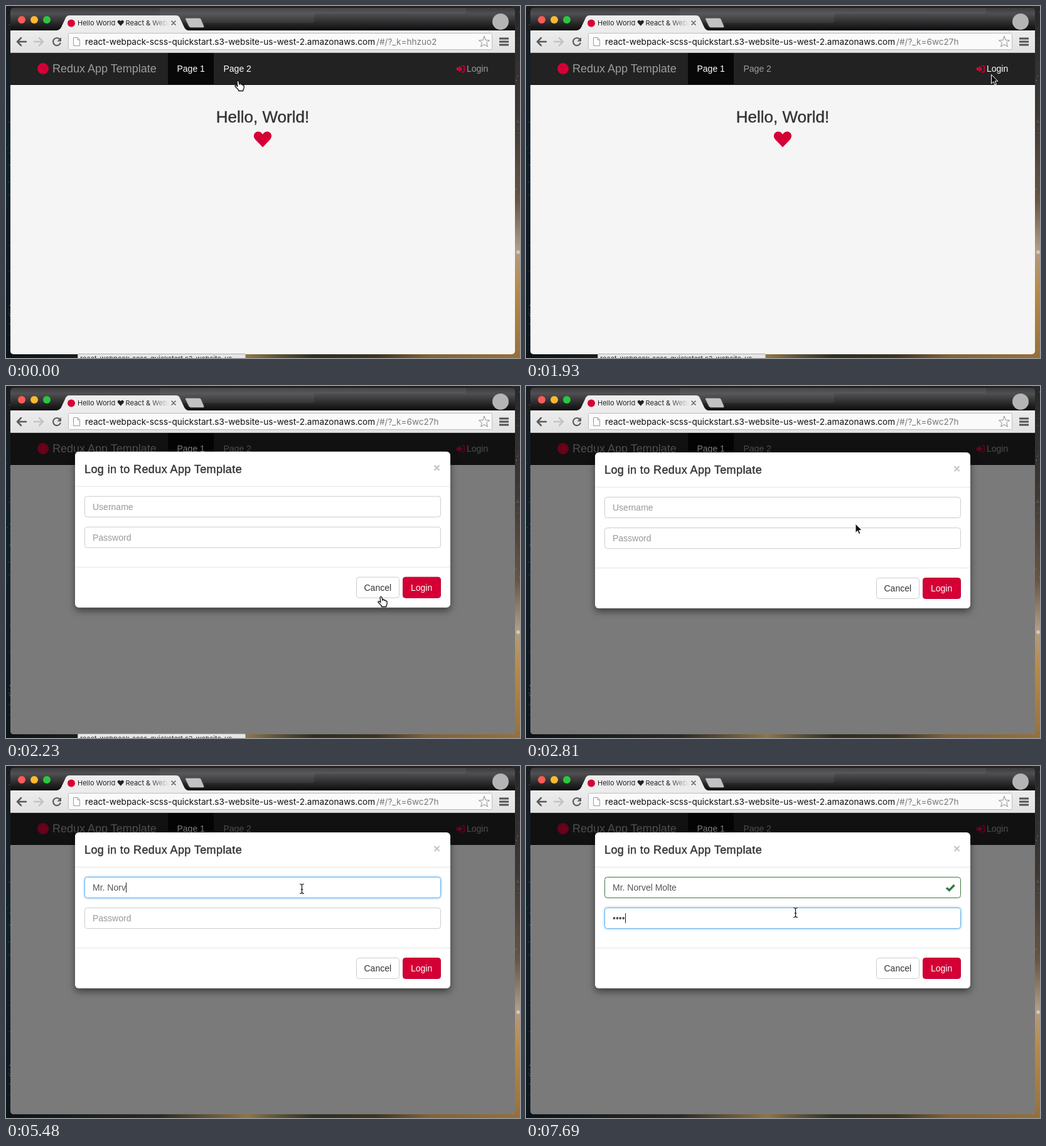
An HTML page for the animation above (7.99 s loop, 819x562 px).

```html
<!DOCTYPE html>
<html lang="en">
<head>
<meta charset="utf-8">
<title>Login walkthrough</title>
<style>
  html, body { margin: 0; width: 100%; height: 100%; overflow: hidden; background: #0d151b; }
  svg { display: block; }
  text { font: 14px "Liberation Sans", Arial, sans-serif; white-space: pre; }
  .ui { font-family: Inter, Roboto, sans-serif; }
  .medium { fill: #333; stroke: #333; stroke-width: .4; }
  .line { fill: none; stroke-linecap: round; stroke-linejoin: round; }
  .field { fill: #fff; stroke: #ccc; }
  .focus { stroke: #66afe9; filter: drop-shadow(0 0 2px rgba(102, 175, 233, .75)); }
  .valid { stroke: #3c763d; }
  #modal > .box { filter: drop-shadow(0 5px 6px rgba(0, 0, 0, .5)); }
</style>
</head>
<body>
<svg width="819" height="562" viewBox="0 0 819 562">
  <defs>
    <linearGradient id="left" x2="0" y2="1">
      <stop offset="0" stop-color="#1a1d20"/><stop offset=".4" stop-color="#10202b"/><stop offset="1" stop-color="#0c161c"/>
    </linearGradient>
    <linearGradient id="right" x2="0" y2="1">
      <stop offset="0" stop-color="#26282a"/><stop offset=".3" stop-color="#3c3835"/><stop offset=".55" stop-color="#665544"/>
      <stop offset=".69" stop-color="#b09c84"/><stop offset=".8" stop-color="#b88a48"/><stop offset="1" stop-color="#96703c"/>
    </linearGradient>
    <linearGradient id="bottom">
      <stop offset="0" stop-color="#0b1318"/><stop offset=".3" stop-color="#2a2a25"/><stop offset=".47" stop-color="#8f7546"/>
      <stop offset=".53" stop-color="#5a5238"/><stop offset=".6" stop-color="#2e2e22"/><stop offset=".72" stop-color="#3c3422"/>
      <stop offset=".82" stop-color="#80623a"/><stop offset="1" stop-color="#96703c"/>
    </linearGradient>
    <linearGradient id="titlebar" x2="0" y2="1">
      <stop offset="0" stop-color="#3c3c3e"/><stop offset=".25" stop-color="#505052"/><stop offset=".6" stop-color="#303032"/>
      <stop offset="1" stop-color="#0c0c0d"/>
    </linearGradient>
    <linearGradient id="toolbar" x2="0" y2="1">
      <stop offset="0" stop-color="#ececec"/><stop offset="1" stop-color="#e2e2e2"/>
    </linearGradient>
    <linearGradient id="fade" gradientUnits="userSpaceOnUse" x1="230" x2="260" y1="0" y2="0">
      <stop offset="0" stop-color="#222"/><stop offset="1" stop-color="#222" stop-opacity="0"/>
    </linearGradient>
    <clipPath id="window"><rect x="7" y="3" width="804" height="553" rx="5"/></clipPath>
    <clipPath id="tabClip"><path d="M97 15H260V39H97Z"/></clipPath>
    <path id="heart" d="M409 225.5L397.5 213.5C391.5 206.5 397 200 402.5 200.5C406 200.8 408 203.5 409 205C410 203.5 412 200.8 415.5 200.5C421 200 426.5 206.5 420.5 213.5Z"/>
  </defs>

  <!-- desktop -->
  <path fill="#24211e" d="M0 0H819V8H0Z"/>
  <path fill="url(#left)" d="M0 0H12V562H0Z"/>
  <path fill="url(#right)" d="M806 0H819V562H806Z"/>
  <path fill="url(#bottom)" d="M0 551H819V562H0Z"/>
  <g id="stars" fill="#b9c8d2"></g>
  <circle cx="816" cy="393" r="3" fill="#e0dcd8" opacity=".7"/>

  <g clip-path="url(#window)">
    <!-- tab strip -->
    <path fill="url(#titlebar)" d="M7 3H811V39H7Z"/>
    <path fill="#fff" opacity=".05" d="M245 3H491V27H245ZM491 3H733V12H491Z"/>
    <circle cx="25" cy="22" r="6" fill="#fc5b57"/>
    <circle cx="45" cy="22" r="6" fill="#fdb92f"/>
    <circle cx="65" cy="22" r="6" fill="#2ac83f"/>
    <path fill="#ececec" d="M81 39Q86 38 88 34L95 19Q97 15 101 15H271Q275 15 277 19L284 34Q286 38 290 39Z"/>
    <path fill="#c2c2c2" stroke="#4a4a4a" d="M287 19H307Q310 19 311 21L315.500 32Q316 34.500 314 34.500H295Q292 34.500 291 32L285.500 21Q285 19 287 19Z"/>
    <circle cx="104" cy="27.500" r="6" fill="#d40035"/>
    <g clip-path="url(#tabClip)" fill="url(#fade)">
      <text class="ui" x="114" y="31" style="font-size:11px">Hello World</text>
      <text class="ui" x="190.500" y="31" style="font-size:11px">React &amp; Webpack</text>
    </g>
    <use href="#heart" fill="#222" transform="translate(35.500 -49.500) scale(.36)"/>
    <path class="line" stroke="#5b5b5b" stroke-width="1.500" d="M264 24L270 30M270 24L264 30"/>
    <circle cx="788" cy="25" r="13" fill="#b4b4b4"/>

    <!-- toolbar -->
    <path fill="url(#toolbar)" d="M7 39H811V75H7Z"/>
    <path fill="#b5b5b5" d="M7 74H811V75H7Z"/>
    <rect x="99.500" y="43.500" width="675" height="26" rx="2" fill="#fafafa" stroke="#bdbdbd"/>
    <g class="line" stroke-width="2.500">
      <path stroke="#5a5a5a" d="M32 57H19M24 51L18 57L24 63"/>
      <path stroke="#c3c3c3" d="M45 57H58M53 51L59 57L53 63"/>
      <path stroke="#5a5a5a" stroke-width="2.200" d="M85.500 53A6 6 0 1 0 86.500 59.500"/>
    </g>
    <path fill="#5a5a5a" d="M88 50V56.500H81.500Z"/>
    <path fill="#fff" stroke="#9a9a9a" d="M107.500 50.500H114L117.500 54V63.500H107.500ZM114 50.500V54H117.500"/>
    <text class="ui" x="126" y="62" fill="#111" style="font-size:13.600px">react-webpack-scss-quickstart.s3-website-us-west-2.amazonaws.com</text>
    <text class="ui" id="path" x="590" y="62" fill="#777" style="font-size:13.600px"></text>
    <path class="line" stroke="#8d8d8d" d="M762 48.500L764.300 54.500L770.500 54.800L765.700 58.800L767.300 65L762 61.500L756.700 65L758.300 58.800L753.500 54.800L759.700 54.500Z"/>
    <path stroke="#555" stroke-width="2.800" d="M786 52H801M786 57H801M786 62H801"/>

    <!-- page -->
    <path fill="#f5f5f5" d="M7 126H811V556H7Z"/>
    <path fill="#222" d="M7 75H811V126H7Z"/>
    <path fill="#080808" d="M7 125H811V126H7Z"/>
    <circle cx="59" cy="100" r="9" fill="#d40035"/>
    <text x="74" y="106" fill="#9d9d9d" style="font-size:18px">Redux App Template</text>
    <rect id="active" y="75" width="73" height="50" fill="#080808"/>
    <text id="nav1" x="272.500" y="105">Page 1</text>
    <text id="nav2" x="346.500" y="105">Page 2</text>
    <path fill="#d40035" d="M718 98H722V95L727.500 100.500L722 106V103H718Z"/>
    <path class="line" stroke="#d40035" stroke-width="1.500" d="M726.500 95.500H728.500Q730.300 95.500 730.300 97.500V103.500Q730.300 105.500 728.500 105.500H726.500"/>
    <text id="login" x="734" y="105">Login</text>
    <text id="heading" class="medium" x="409" y="186" text-anchor="middle" style="font-size:26px"></text>
    <use id="love" href="#heart" fill="#d40035"/>
    <path id="shade" d="M7 75H811V556H7Z"/>
  </g>

  <!-- link hint -->
  <g id="hint">
    <path fill="#e6e6e6" stroke="#b0b0b0" d="M114.500 566V557Q114.500 555.500 116 555.500H380Q381.500 555.500 381.500 557V566"/>
    <text class="ui" x="118" y="567" fill="#333" style="font-size:11px">react-webpack-scss-quickstart.s3-website-us-</text>
  </g>

  <g id="modal">
    <rect class="box" x="110" y="106" width="598" height="249" rx="6" fill="#fff"/>
    <text class="medium" x="125" y="140" style="font-size:18px;letter-spacing:.4px">Log in to Redux App Template</text>
    <path stroke="#c6c6c6" stroke-width="2.400" d="M682.500 128L690.500 136M690.500 128L682.500 136"/>
    <path stroke="#e5e5e5" d="M110 161.500H708M110 290.500H708"/>
    <rect id="userBox" x="125.500" y="177.500" width="567" height="33" rx="4"/>
    <rect id="passBox" x="125.500" y="226.500" width="567" height="33" rx="4"/>
    <text id="user" x="138" y="199"></text>
    <text id="pass" x="138" y="248"></text>
    <path id="check" fill="none" stroke="#2f7a3a" stroke-width="3.400" d="M670 194.500L674.500 198.500L682.500 190"/>
    <rect id="caret" width="1" height="16" fill="#222"/>
    <rect x="558.500" y="306.500" width="68" height="33" rx="4" fill="#fff" stroke="#ccc"/>
    <text x="570.500" y="328" fill="#333">Cancel</text>
    <rect x="632.500" y="306.500" width="60" height="33" rx="4" fill="#d40035" stroke="#bf0030"/>
    <text x="645" y="328" fill="#fff">Login</text>
  </g>

  <!-- pointers, each drawn around its hot spot -->
  <path id="arrow" fill="#111" stroke="#fff" d="M0 0V14.500L3.300 11.300L5.600 16.500L8 15.500L5.700 10.400H10.300Z"/>
  <path id="hand" fill="#fff" stroke="#111" stroke-width="1.300" stroke-linejoin="round" d="M-1.500 1Q0 -1.300 1.500 1L2.500 6V4.500Q4 3.200 5 5V6Q6.500 4.500 7.500 6.300V7Q9.500 6 9.700 8.500V11Q9.500 13 8.300 14.500V16H1V14.500L-4.300 9Q-5 6.800 -2.800 7.300L-.6 9Z"/>
  <g id="beam" class="line">
    <path stroke="#fff" stroke-width="2.500" opacity=".7" d="M0 -6.500V6.500"/>
    <path stroke="#111" stroke-width="1.200" d="M-3 -7.500Q0 -7.500 0 -5.500Q0 -7.500 3 -7.500M0 -5.500V5.500M-3 7.500Q0 7.500 0 5.500Q0 7.500 3 7.500M-1.500 1H1.500"/>
  </g>
</svg>
<script>
const LOOP = 7990;
const NAME = "Mr. Norvel Molte";
const $ = id => document.getElementById(id);
const show = (id, on) => $(id).style.display = on ? "" : "none";
const set = (id, name, value) => $(id).setAttribute(name, value);

// Each track holds [start time, value...] rows; a row lasts until the next one.
const pointer = [
  [0, "hand", 369.5, 119.5], [290, "hand", 340, 116], [440, "hand", 300, 112],
  [1030, "arrow", 741.5, 109.5], [2230, "hand", 597.5, 336.5],
  [2380, "arrow", 580, 292], [2520, "arrow", 556, 254], [2670, "arrow", 525, 220],
  [2820, "beam", 496, 190], [2960, "beam", 479, 178], [3100, "beam", 471.5, 196],
  [6660, "beam", 458, 207], [6800, "beam", 438, 227], [6950, "beam", 430.5, 234],
  [7100, "beam", 429.5, 234]
];
const dialog = [[0, 0, 0, 0], [2080, .8, .39, -27.5], [2230, 1, .5, -1.3], [2380, 1, .5, 0]];
const typed = [
  [0, 0], [4150, 1], [4290, 2], [4440, 3], [4740, 4], [4890, 5], [5180, 6], [5330, 7],
  [5470, 8], [5620, 9], [5770, 11], [5920, 12], [6060, 14], [6210, 15], [6510, 16]
];
const dots = [[0, 0], [7250, 1], [7400, 2], [7540, 3], [7690, 4]];
const blink = [[0, 0], [3250, 1], [4000, 0], [4150, 1], [6950, 0], [7100, 1]];

const at = (track, t) => track.findLast(row => row[0] <= t).slice(1);

function drawField(id, value, hint) {
  $(id).textContent = value || hint;
  set(id, "fill", value ? "#555" : "#999");
  return 138 + (value ? $(id).getComputedTextLength() : 0);
}

function draw(t) {
  const second = t >= 150 && t < 890;
  $("path").textContent = t < 150 ? "/#/?_k=hhzuo2" : second ? "/#/page2?_k=t4v9xe" : "/#/?_k=6wc27h";
  $("heading").textContent = second ? "Page 2" : "Hello, World!";
  show("love", !second);
  set("active", "x", second ? 331 : 258);
  set("nav1", "fill", !second || t >= 440 ? "#fff" : "#9d9d9d");
  set("nav2", "fill", t < 890 ? "#fff" : "#9d9d9d");
  set("login", "fill", t >= 1030 && t < 2230 ? "#fff" : "#9d9d9d");
  show("hint", t < 2520);

  const [opacity, shade, drop] = at(dialog, t);
  set("shade", "opacity", shade);
  set("modal", "opacity", opacity);
  set("modal", "transform", `translate(0 ${drop})`);

  const onPass = t >= 7100;
  set("userBox", "class", "field " + (onPass ? "valid" : t >= 3250 ? "focus" : ""));
  set("passBox", "class", "field " + (onPass ? "focus" : ""));
  show("check", onPass);
  const userEnd = drawField("user", NAME.slice(0, at(typed, t)[0]), "Username");
  const passEnd = drawField("pass", "•".repeat(at(dots, t)[0]), "Password");
  set("caret", "x", Math.round(onPass ? passEnd : userEnd));
  set("caret", "y", onPass ? 235 : 186);
  show("caret", at(blink, t)[0]);

  const [shape, x, y] = at(pointer, t);
  for (const id of ["arrow", "hand", "beam"]) show(id, id === shape);
  set(shape, "transform", `translate(${x} ${y})`);
}

// Sparse stars along the visible edges of the desktop.
let seed = 7;
const random = () => (seed = seed * 16807 % 2147483647) / 2147483647;
for (let i = 0; i < 70; i++) {
  const x = random() * 7 + (i % 2 ? 812 : 0), y = random() * (i % 2 ? 380 : 555);
  $("stars").innerHTML += `<circle cx="${x}" cy="${y}" r="${.3 + random() * .5}" opacity="${.2 + random() * .5}"/>`;
}

const start = performance.now();
function tick() {
  draw((performance.now() - start) % LOOP);
  requestAnimationFrame(tick);
}
tick();
</script>
</body>
</html>
```
